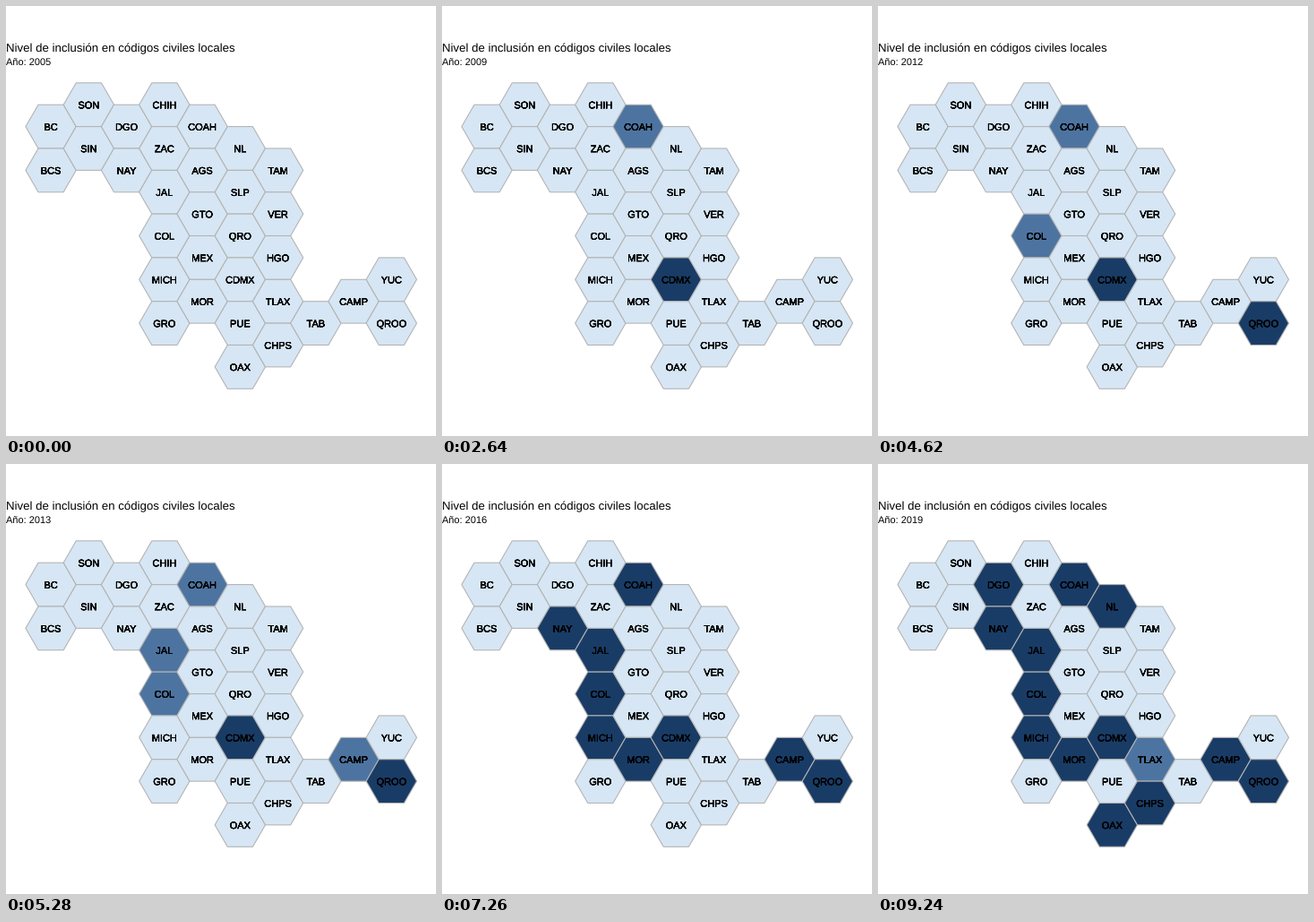
A matplotlib script for the animation above (9.9 s loop, 480 by 480 pixels).

```python
import matplotlib.pyplot as plt
import numpy as np
from matplotlib.animation import FuncAnimation
from matplotlib.patheffects import Normal

plt.rcParams["font.family"] = "Liberation Sans"
plt.rcParams["text.hinting"] = "none"

SIZE, DPI = 480, 100
PT = 72 / DPI  # points per pixel
FIRST_YEAR, YEARS, STEP_MS = 2005, 15, 660

HALF = 24.39  # half the height of a hexagon
RADIUS = HALF * 2 / np.sqrt(3)
X0, Y0 = 50.1, 110.2
FILLS = ["#D6E6F4", "#4D74A0", "#193C66"]

# each column: offset in half heights, then states from top to bottom
COLUMNS = [
    (1, "BC BCS"),
    (0, "SON SIN"),
    (1, "DGO NAY"),
    (0, "CHIH ZAC JAL COL MICH GRO"),
    (1, "COAH AGS GTO MEX MOR"),
    (2, "NL SLP QRO CDMX PUE OAX"),
    (3, "TAM VER HGO TLAX CHPS"),
    (10, "TAB"),
    (9, "CAMP"),
    (8, "YUC QROO"),
]

# (year, level, states reaching that level)
REFORMS = [
    (2006, 1, "CDMX"),
    (2007, 1, "COAH"),
    (2009, 2, "CDMX"),
    (2011, 1, "COL"),
    (2012, 2, "QROO"),
    (2013, 1, "JAL CAMP"),
    (2014, 2, "COAH"),
    (2015, 2, "NAY"),
    (2016, 2, "JAL COL MICH MOR CAMP"),
    (2017, 1, "TLAX"),
    (2017, 2, "DGO CHPS"),
    (2019, 2, "NL OAX"),
]

fig = plt.figure(figsize=(SIZE / DPI, SIZE / DPI), dpi=DPI, facecolor="white")
ax = fig.add_axes([0, 0, 1, 1])
ax.set(xlim=(0, SIZE), ylim=(SIZE, 0))
ax.axis("off")


def write(x, y, text, px, **style):
    return ax.text(x, y, text, size=px * PT, color="black", va="baseline", **style)


def add_state(x, y, name):
    angles = np.arange(6) * np.pi / 3
    cell, = ax.fill(x + RADIUS * np.cos(angles), y + RADIUS * np.sin(angles),
                    fc=FILLS[0], ec="#B3B3B3", lw=1.07 * PT, joinstyle="round")
    # overprinting thickens the antialiased edges of the label
    write(x, y + 4.2, name, 11, ha="center", path_effects=[Normal()] * 6)
    return cell


cells = {}
for col, (offset, names) in enumerate(COLUMNS):
    for row, name in enumerate(names.split()):
        cells[name] = add_state(X0 + 1.5 * RADIUS * col,
                                Y0 + HALF * (offset + 2 * row), name)

write(0, 51, "Nivel de inclusión en códigos civiles locales", 13.2)
subtitle = write(0, 67, "", 11)


def update(step):
    year = FIRST_YEAR + step
    levels = dict.fromkeys(cells, 0)
    for since, level, names in REFORMS:
        if since <= year:
            levels.update(dict.fromkeys(names.split(), level))
    for name, cell in cells.items():
        cell.set_facecolor(FILLS[levels[name]])
    subtitle.set_text(f"Año: {year}")
    return [*cells.values(), subtitle]


anim = FuncAnimation(fig, update, frames=YEARS, interval=STEP_MS,
                     repeat=True, repeat_delay=0, blit=False)
plt.show()
```
